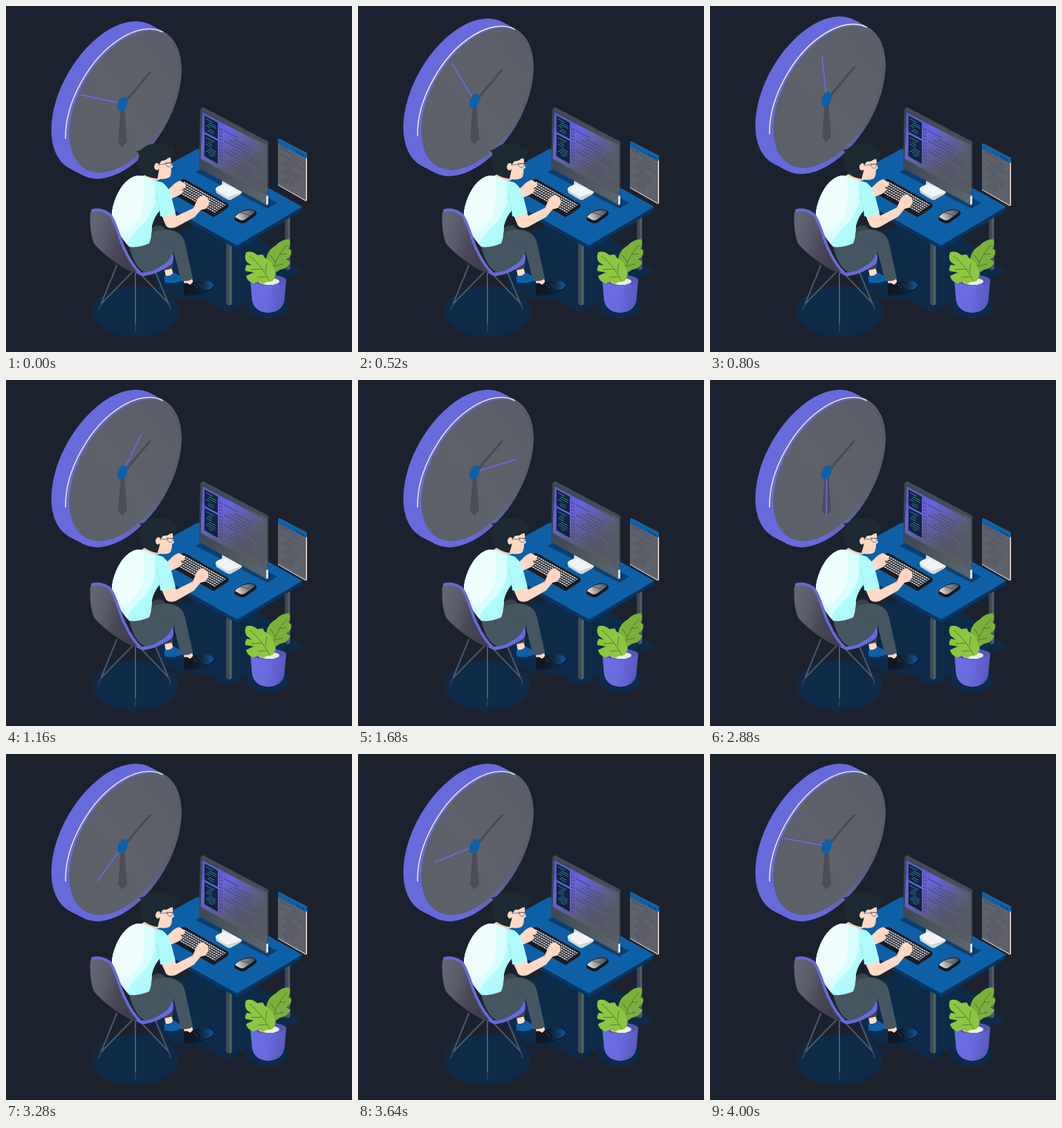
Animation, 500 px wide and 500 px high, one loop 4040 ms. Source, as an HTML page with a canvas:

```html
<!DOCTYPE html>
<html lang="en">
<head>
<meta charset="utf-8">
<title>Late at the desk</title>
<style>
  html, body { margin: 0; width: 100%; height: 100%; overflow: hidden; background: #1c222d; }
  canvas { display: block; width: 500px; height: 500px; }
</style>
</head>
<body>
<canvas id="stage" width="500" height="500"></canvas>
<script>
const canvas = document.getElementById('stage');
const ctx = canvas.getContext('2d');
const LOOP = 4040, TURN = 4020, SETTLE = 1060;

const BG = '#1c222d', SHADE = '#0e2a49', BLUE = '#0e60a6', VIOLET = '#676adb';
const GREY = '#5e626b', SLATE = '#465660', SKIN = '#ffd9c4', HAIR = '#1d2a32', CREAM = '#f4e3d7';

function fill(d, color) {
  ctx.fillStyle = color;
  ctx.fill(new Path2D(d));
}

function line(d, color, width) {
  ctx.strokeStyle = color;
  ctx.lineWidth = width;
  ctx.stroke(new Path2D(d));
}

function oval(x, y, rx, ry, color, turn = 0) {
  ctx.fillStyle = color;
  ctx.beginPath();
  ctx.ellipse(x, y, rx, ry, turn, 0, Math.PI * 2);
  ctx.fill();
}

function blend(x0, y0, x1, y1, ...colors) {
  const g = ctx.createLinearGradient(x0, y0, x1, y1);
  colors.forEach((c, i) => g.addColorStop(i / (colors.length - 1), c));
  return g;
}

function moved(dx, dy, draw) {
  ctx.save();
  ctx.translate(dx, dy);
  draw();
  ctx.restore();
}

function turned(x, y, angle, draw) {
  ctx.save();
  ctx.translate(x, y);
  ctx.rotate(angle);
  ctx.translate(-x, -y);
  draw();
  ctx.restore();
}

// Circle lying on the isometric wall
function wallCircle(x, y, r, from = 0, to = Math.PI * 2) {
  ctx.save();
  ctx.transform(0.866, -0.5, 0, 1, x, y);
  ctx.beginPath();
  ctx.arc(0, 0, r, from, to);
  ctx.restore();
}

function fillWall(x, y, r, color) {
  wallCircle(x, y, r);
  ctx.fillStyle = color;
  ctx.fill();
}

// Rows of code on a plane that falls to the right
function codeRows(x, y, rows, gap, slope, width, seed, color, weight) {
  ctx.strokeStyle = color;
  ctx.lineWidth = weight;
  ctx.beginPath();
  for (let i = 0; i < rows; i++) {
    const k = (i * 37 + seed * 13) % 17 / 17;
    const start = width * 0.14 * (i * 2 % 3);
    const end = Math.min(width, start + width * (0.35 + 0.6 * k));
    ctx.moveTo(x + start, y + i * gap + start * slope);
    ctx.lineTo(x + end, y + i * gap + end * slope);
  }
  ctx.stroke();
}

function drawShadows() {
  oval(187, 441.5, 62, 36.5, SHADE);
  fill('M205 340L320 300L410 372L428 384L374 413L346 427L321 442L288 425L246 420L220 410Z', SHADE);
  oval(378, 433, 31, 18.5, SHADE);
}

function drawClock(time) {
  const x = 169.5, y = 133, r = 97;
  for (let i = 0; i <= 40; i++) fillWall(x - i / 2, y - i * 0.26, r, VIOLET);
  fillWall(x, y, r, blend(165, 0, 238, 0, VIOLET, '#585c69'));
  wallCircle(x, y, r - 0.6, Math.PI * 0.99, Math.PI * 1.74);
  ctx.strokeStyle = CREAM;
  ctx.lineWidth = 1.6;
  ctx.stroke();
  fillWall(170.5, 130.7, 91.3, blend(95, 190, 245, 80, '#5b6069', GREY, '#5b5f69'));

  fill('M167 134L206 88Q209 86 210.5 88L171 135Z', '#484c56');
  fill('M166 136L162 189L168 196L175 188L171 136Z', '#4a4d57');
  const a = time / TURN * Math.PI * 2 + 0.212;
  ctx.lineCap = 'round';
  line(`M168.5 133.3L${168.5 - 61.5 * Math.cos(a)} ${133.3 - 61.5 * Math.sin(a)}`, '#6c69df', 1.9);
  ctx.lineCap = 'butt';
  oval(168.3, 133.5, 6.8, 11, BLUE, 0.36);
}

function drawDesk() {
  fill('M403 300H407V382L403 380Z', '#3c4853');
  fill('M407 300H410.5V380L407 382Z', '#4f5d66');
  fill('M318 340H322.5V433L318 431Z', '#3f4c56');
  fill('M322.5 340H326.5V431L322.5 433Z', '#4f5f69');
  fill('M180 260L334 346L428 290V295L334 351.5L180 266Z', '#0a3562');
  fill('M277 206L428 290L334 346L180 260Z', BLUE);
  fill('M274 240L284 233L392 284L378 293Z', '#0a3e72');
}

function drawMonitor() {
  fill('M313 250L333 260V270L311 263Z', '#d8dfe2');
  fill('M303 266Q302 263 306 261L314 257L340 267Q342 269 339 271L325 279Q321 280 317 277Z', '#f2f5f5');
  fill('M303 266L320 276L341 269Q341 271 339 272L325 280Q321 281 317 278L304 270Z', '#cfd6d9');
  fill('M281 149L284.5 146L379 196V286L376 288L279 234Z', '#414c55');
  fill('M281 149L377 200V287L279 234Z', blend(280, 220, 378, 270, '#3d4650', '#5c666f'));
  fill('M284 153.5L375.5 202.5V273L281.5 221Z',
    blend(297, 165, 352, 258, '#5b58c6', '#6864de', '#5f5e9c', '#585b6a', '#555a64'));
  fill('M376 275L379 273.5V286L376 288Z', '#dde3e4');

  fill('M287 158.5L306 168.5V192L287 182Z', '#10243c');
  fill('M287 185L306 195V228L286.5 217Z', '#10243c');
  codeRows(289, 163, 6, 3.2, 0.53, 15, 2, '#3b8ea6', 0.9);
  codeRows(289, 190, 8, 3.2, 0.53, 15, 5, '#3b8ea6', 0.9);
  codeRows(315, 180, 11, 4.9, 0.53, 53, 4, '#4a4c74', 1.1);
  for (let i = 0; i < 11; i++) {
    line(`M308 ${177 + i * 4.9}l4.5 2.4`, '#4a4c80', 1.6);
  }
}

function drawPanel() {
  fill('M393 201L395 200L435 221V289L433 290L393 267Z', CREAM);
  fill('M393 201L433.5 222V289L393 266Z', GREY);
  fill('M393 201L395 200L435 221V227L433 228L393 207Z', BLUE);
  for (let i = 0; i < 3; i++) oval(421 + i * 4, 219 + i * 2.1, 1, 1.2, '#0b3158');
  line('M399 211L396.5 212.5L399 216M402 212L400.5 217M404 214L406 217L403.5 218', '#414650', 1);
  codeRows(408, 219, 2, 4, 0.52, 18, 3, '#484d57', 1);
  codeRows(397, 223, 10, 4.1, 0.52, 32, 1, '#4b505a', 1);
}

function drawKeyboard() {
  fill('M254 251Q257 249 260 251L321 286Q323 289 320 292L302 304Q299 306 296 303L240 271Q237 268 240 264Z', '#1a1c21');
  ctx.setLineDash([2.9, 0.8]);
  for (let i = 0; i < 6; i++) {
    line(`M${257 - i * 2.9} ${254.5 + i * 2}l60 33.5`, '#c9cacd', 1.9);
  }
  ctx.setLineDash([]);
}

function drawMouse() {
  fill('M330 307Q330 303 336 299L348 294Q358 293 362 298Q363 301 359 304L346 313Q342 315 337 313L331 310Z', '#15171d');
  fill('M331 305Q333 301 340 298L349 295Q357 294 360 298L346 308Q342 311 338 309Z',
    blend(335, 307, 357, 296, '#d8d5d3', '#8c8b8e', '#50535b'));
  line('M339 299Q348 300 353 303', '#383c44', 0.8);
}

function drawPlant() {
  fill('M353 396Q378 382 405 395L402.5 424Q400 442 379 443.5Q358 442 355.5 424Z',
    blend(353, 410, 405, 420, '#6d6de3', '#686ade', '#5658bd'));
  oval(379, 396, 25.5, 7.5, '#5557b8');
  oval(380, 398, 15, 5, '#eceede');
  fill('M379 400C378 388 374 379 376 369C376 360 380 351 390 346C394 341 401 337 409 337C412 342 410 346 408 351L412 353C413 359 411 363 405 366L411 370C408 377 403 380 396 381L390 385C390 393 387 396 380 401Z', '#7bb03c');
  line('M381 398Q387 365 406 345M389 370L382 360M387 376L401 373M395 359L405 358', '#516b3c', 0.9);
  fill('M378 402C372 402 368 401 365 398L358 401C352 399 348 396 347 390L358 385L346 383C345 380 346 377 348 374L355 375L348 370C345 365 345 360 347 356C352 354 358 355 363 360L371 359L374 364C382 367 388 376 388 384C389 391 386 397 381 401Z', '#8dc63f');
  line('M382 400Q373 379 352 361M375 385L377 371M371 380L354 381M378 391L363 392', '#54753a', 0.9);
  fill('M372 401Q380 396 391 399L387 403H376Z', '#eef0e2');
}

function drawLegs() {
  fill('M228 376L238 374L242 388L231 391Z', SKIN);
  fill('M208 324Q217 313 227 319L240 334L241 379L229 382L222 345Z', '#35444e');
  fill('M229 390Q233 389 236 391L242 385L255 392Q257 398 251 401Q243 404 229 402Z', BLUE);
  fill('M228 399Q243 403 255 396Q257 400 251 403Q240 406 229 403Z', '#0b2e54');

  fill('M256 391L268 390L271 402L258 404Z', SKIN);
  fill('M178 348L208 338L212 327Q232 319 247 327Q257 332 259 344L270 394Q263 399 253 397L242 354L240 364Q225 382 203 386Q186 380 178 348Z', SLATE);
  line('M242 354Q240 345 230 343', '#3a4953', 1);
  fill('M257 401Q262 399 266 403L271 398L291 397Q299 398 300 404Q298 410 287 412Q275 420 257 418Z',
    blend(258, 405, 300, 405, '#11171f', '#101c2b', '#0d5ca0'));
  line('M272 402L277 408M277 400L282 406', '#31445a', 1);
  line('M257 417.5Q275 419 287 412Q298 411 300 405', '#0b1d35', 1.6);
}

function drawFarArm() {
  fill('M229 266L237 259Q243 252 250 250L257 254Q260 257 257 260L252 262L255 265Q251 271 244 273L235 277Z', SKIN);
  line('M249 258L255 261M247 263L253 266', '#eebba5', 0.8);
}

function drawNearArm() {
  fill('M223 299L243 297L246 303L270 291L275 279Q278 273 285 272L290 276Q294 280 292 285L288 291L281 293L272 304L246 319Q236 323 231 317Z', SKIN);
  line('M284 279L289 283M280 282L287 287', '#ecb8a2', 0.8);
}

function drawShirt() {
  fill('M186 246Q197 243 211 251L226 255Q235 262 238 272L245 299Q235 305 223 304L222 296Q214 305 211 318Q211 333 207 343Q192 350 178 348Q162 332 153 302Q153 290 160 274Q170 252 186 246Z', '#b0fcfc');
  fill('M186 246Q197 243 211 251L215 254V284Q208 308 192 320Q180 332 175 344Q160 328 153 302Q153 290 160 274Q170 252 186 246Z', '#d9fefd');
  fill('M186 246Q192 244 199 247V284Q196 306 180 320L167 328Q156 313 153 302Q153 290 160 274Q170 252 186 246Z', '#eefffe');
  line('M221 296Q222 284 217 274', '#94e8ea', 1);
}

function drawHead() {
  fill('M197 244L222 236L224 250Q216 257 197 248Z', '#f9cbb5');
  fill('M214 218L239 215Q242 222 241 228L243 235L240 237Q240 247 236 250Q228 253 219 250L214 236Z', SKIN);
  fill('M195 217C198 212 195 209 192 207C199 208 201 204 206 202C213 198 218 199 222 200C228 198 233 200 236 202L239 207C243 205 247 208 248 211C247 217 244 222 237 222C234 225 231 225 227 225L224 229L222 239L219 250Q207 248 200 242C194 235 192 225 195 217Z', HAIR);
  oval(220, 232.5, 3.9, 5.2, SKIN, 0.15);
  line('M222 230L232 230M232.5 228.5Q233 234 238 235Q241 234 241.5 229', '#54636c', 0.8);
  line('M232 229H242', HAIR, 0.9);
  line('M237 244L240 243.5', '#d89b86', 0.8);
}

function drawChair() {
  ctx.lineCap = 'round';
  line('M160 375L134 439M183 384L137 431M187 384V470M193 386L236 431M214 380L238 438', '#4d5963', 2);
  line('M187 461V470M134 439L137 432M238 438L235 431', '#323b45', 2.3);
  ctx.lineCap = 'butt';
  const back = 'M121.5 303Q121 295 129 294Q141 295 150 302C160 314 163 336 172 353Q182 375 194 387';
  fill(back + 'Q186 388 165 375Q140 359 127 343Q121 328 121.5 303Z',
    blend(122, 330, 182, 348, '#62656f', '#585c67', '#494757', '#423f4c'));
  ctx.lineJoin = ctx.lineCap = 'round';
  line('M125 295.5Q137 292 150 301C160 314 163 336 172 353Q182 375 195 387Q218 389 240 364', VIOLET, 4);
  fill('M187 384Q220 391 241 357Q244 371 238 374Q220 387 201 390Q193 391 187 384Z', VIOLET);
  fill('M201 383.5Q222 382 240 360Q231 378 201 383.5Z', SLATE);
  ctx.lineJoin = 'miter';
  ctx.lineCap = 'butt';
}

function drawScene(time) {
  const u = Math.min(1, time / SETTLE);
  const rest = 0.5 + 0.5 * Math.cos(Math.PI * u);

  ctx.fillStyle = BG;
  ctx.fillRect(0, 0, 500, 500);
  drawShadows();
  moved(0, 8 * rest, () => drawClock(time));
  drawDesk();
  drawMonitor();
  moved(0, -8 * rest, drawPanel);
  drawKeyboard();
  drawMouse();
  drawPlant();
  drawLegs();
  moved(1.5 * rest, 2.5 * rest, drawFarArm);
  turned(233, 312, 0.035 * rest, drawNearArm);
  turned(215, 250, -0.105 * rest, drawHead);
  drawShirt();
  drawChair();
}

const start = performance.now();
function tick() {
  drawScene((performance.now() - start) % LOOP);
  requestAnimationFrame(tick);
}
tick();
</script>
</body>
</html>
```
